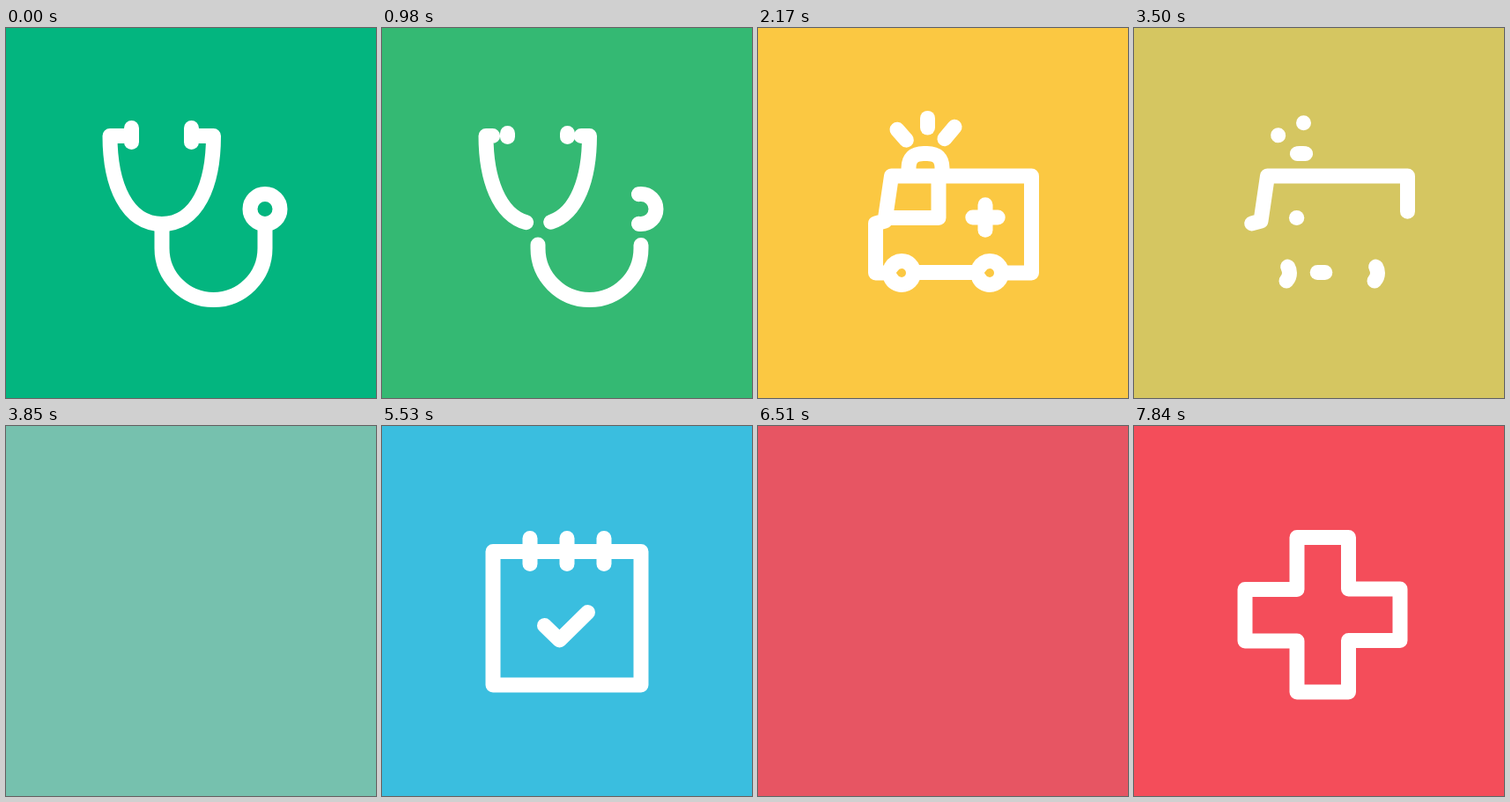
Animation, 420 px wide and 420 px high, one loop 8 s. Source, as an HTML page:

```html
<!DOCTYPE html>
<html lang="en">
<head>
<meta charset="utf-8">
<title>Medical icons</title>
<style>
html, body { margin: 0; width: 100%; height: 100%; overflow: hidden; }
svg { display: block; width: 100vw; height: 100vh; }
path { fill: none; stroke: #fff; stroke-width: 17; stroke-linecap: round; stroke-linejoin: round; }
</style>
</head>
<body>
<svg viewBox="0 0 420 420"></svg>
<script>
const LOOP = 8000, STEP = 70, FIRST = 840, PERIOD = 2520;
const svg = document.querySelector('svg');

const circle = (x, y, r) =>
  `M${x - r},${y}a${r},${r} 0 1 1 ${2 * r},0a${r},${r} 0 1 1 ${-2 * r},0`;

// Part: path, point it shrinks to (0..1), shrink time, grow start, grow time
const part = (d, mid = 0.5, out = 490, start = 630, grow = 770) => ({ d, mid, out, start, grow });

const scenes = [
  { color: [3, 181, 127], parts: [
    part('M142.5,122.5H118C118,178 137,222.5 177,222.5', 0.555),
    part('M210.5,122.5H235.5C235.5,178 217,222.5 177,222.5', 0.51),
    part('M142.5,113.5V129.5', 0.5, 210),
    part('M210.5,113.5V129.5', 0.5, 210),
    part('M177,222.5V250a58.5,58.5 0 0 0 117,0V223'),
    part(circle(294, 205.5, 17), 0.5, 300)
  ] },
  { color: [251, 200, 66], parts: [
    part('M149,278H133.5V222L144,219L151.5,168H310.5V278H277', 0.41, 323, 630, 850),
    part('M148,215.5H205V168', 0.35, 145, 770, 700),
    part('M258,199V231', 0.5, 135, 840, 840),
    part('M242,215H274', 0.5, 135, 840, 840),
    part('M176,277.5H249', 0.5, 178, 700, 770),
    part(circle(163, 278, 13.5), 0.52, 197, 770, 1050),
    part(circle(263, 278, 13.5), 0.52, 197, 770, 1050),
    part('M171,168V159Q171,142.5 188,142.5H192Q209,142.5 209,159V168', 0.5, 178, 770, 840),
    part('M170,129L156,113', 0.45, 145, 980, 840),
    part('M192.5,115V100.5', 0.5, 145, 980, 840),
    part('M210,128L225,110', 0.5, 135, 980, 840)
  ] },
  { color: [58, 190, 223], parts: [
    part('M126,142.5H294V294H126Z'),
    part('M184.5,226.5L201.5,243L233.5,211.5', 0.45, 260, 770, 850),
    ...[168, 210, 252].map(x => part(`M${x},127.5V156.5`, 0.5, 200, 700, 700))
  ] },
  { color: [244, 77, 90], parts: [
    part('M126,185.5H185V126.5H243.5V185H302V243.5H243.5V302H185V244H126Z')
  ] }
];

for (const scene of scenes) for (const p of scene.parts) {
  p.el = document.createElementNS('http://www.w3.org/2000/svg', 'path');
  p.el.setAttribute('d', p.d);
  p.el.setAttribute('pathLength', 1);
  svg.append(p.el);
}

const clamp = x => Math.max(0, Math.min(1, x));
const smooth = x => x * x * (3 - 2 * x);
const easeOut = x => 1 - (1 - x) ** 2.5;

// Background fade pauses briefly while the stage is empty
function fade(t) {
  if (t <= 490) return clamp(t / 710);
  if (t < 630) return 0.69;
  return clamp(0.93 + (t - 630) / 1000);
}

function show(p, amount) {
  p.el.style.display = amount > 0 ? '' : 'none';
  p.el.style.strokeDasharray = `${amount} 9`;
  p.el.style.strokeDashoffset = -p.mid * (1 - amount);
}

function draw(t) {
  let color = scenes[0].color;
  scenes.forEach((scene, i) => {
    const outAt = FIRST + i * PERIOD, inAt = outAt - PERIOD;
    const k = i ? fade(t - inAt) : 1;
    color = color.map((c, n) => c + (scene.color[n] - c) * k);
    const last = i === scenes.length - 1;
    for (const p of scene.parts) {
      const grown = i ? easeOut(clamp((t - inAt - p.start) / p.grow)) : 1;
      const gone = last ? 0 : smooth(clamp((t - outAt) / p.out));
      show(p, grown * (1 - gone));
    }
  });
  svg.style.background = `rgb(${color.map(Math.round)})`;
}

function tick() {
  const t = performance.now() % LOOP;
  draw(Math.floor(t / STEP) * STEP);
  requestAnimationFrame(tick);
}
tick();
</script>
</body>
</html>
```
